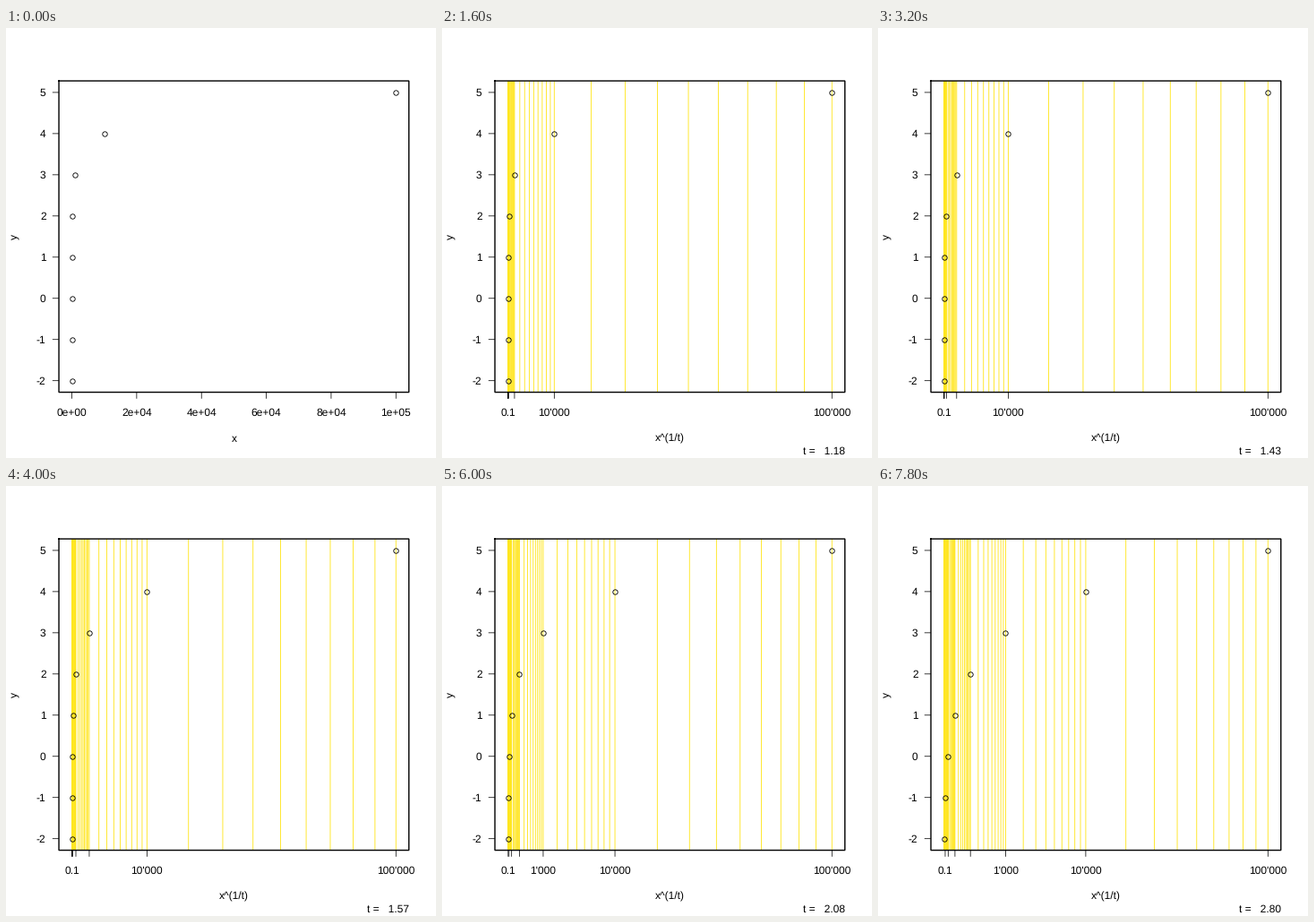
Recreate the animation shown at these times as a matplotlib script. Size 480x480 px, loop 8 s.

```python
import numpy as np
import matplotlib.pyplot as plt
from matplotlib.animation import FuncAnimation

plt.rcParams.update({
    "font.family": "Liberation Sans",
    "font.size": 12,
    "text.hinting": "none",
    "path.snap": False,
})

SIZE, DPI = 480, 72
FRAMES, INTERVAL = 40, 200
LEFT, RIGHT, TOP, BOTTOM = 59.04, 449.76, 59.04, 406.56
TICK = 7.2
PAD = 0.04 / 1.08
YELLOW = "#ffe620"

X = 10.0 ** np.arange(-2, 6)
Y = np.arange(-2, 6)
GRID = np.append(np.outer(X[:-1], np.arange(1, 10)).ravel(), X[-1])
POWER_LABELS = ["0.1", "1", "10", "100", "1'000", "10'000", "100'000"]
LINEAR_TICKS = np.arange(0, 100001, 20000)
LINEAR_LABELS = ["0e+00", "2e+04", "4e+04", "6e+04", "8e+04", "1e+05"]


def exponent(k):
    """The power 1/t applied to x at step k."""
    return 1.0 if k == 0 else 0.99774 - 0.01994 * k + 0.00009 * k * k


def to_px(x, p):
    lo, hi = X[0] ** p, X[-1] ** p
    u = (np.asarray(x, float) ** p - lo) / (hi - lo)
    span = RIGHT - LEFT
    return LEFT + span * (PAD + (1 - 2 * PAD) * u)


def y_px(y):
    u = (np.asarray(y, float) - Y[0]) / (Y[-1] - Y[0])
    span = BOTTOM - TOP
    return BOTTOM - span * (PAD + (1 - 2 * PAD) * u)


def text_width(s):
    narrow = {".": 3.334, "'": 2.29}
    return sum(narrow.get(c, 6.674) for c in s)


def fitting(labels, xs, gap=10):
    """Blank each label that would crowd the one before it."""
    shown, edge = [], -np.inf
    for s, x in zip(labels, xs):
        half = text_width(s) / 2
        fits = x - half - gap > edge
        shown.append(s if fits else "")
        if fits:
            edge = x + half
    return shown


def verticals(xs, y0, y1):
    return [[(x, y0), (x, y1)] for x in xs]


fig = plt.figure(figsize=(SIZE / DPI, SIZE / DPI), dpi=DPI, facecolor="white")
ax = fig.add_axes([0, 0, 1, 1])
ax.set_xlim(0, SIZE)
ax.set_ylim(SIZE, 0)
ax.axis("off")

grid = ax.vlines([], TOP, BOTTOM, color=YELLOW, lw=0.9, zorder=1)
ticks = ax.vlines([], BOTTOM, BOTTOM + TICK, color="black", lw=0.75, zorder=2)
ax.hlines(y_px(Y), LEFT - TICK, LEFT, color="black", lw=0.75, zorder=2)
ax.plot([LEFT, RIGHT, RIGHT, LEFT, LEFT], [TOP, TOP, BOTTOM, BOTTOM, TOP],
        color="black", lw=1.4, solid_joinstyle="miter",
        solid_capstyle="projecting", zorder=3)
points, = ax.plot([], [], "o", ms=5.4, mfc="none", mec="black", mew=0.85,
                  zorder=4)

for v, y in zip(Y, y_px(Y)):
    ax.text(LEFT - 14.4, y + 4.3, str(v), ha="right", va="baseline")
ax.text(12.3, (TOP + BOTTOM) / 2, "y", rotation=90, rotation_mode="anchor",
        ha="center", va="baseline")
x_title = ax.text((LEFT + RIGHT) / 2, 461.6, "", ha="center", va="baseline")
t_label = ax.text(RIGHT, 476, "", ha="right", va="baseline")
tick_texts = [ax.text(0, 433, "", ha="center", va="baseline")
              for _ in POWER_LABELS]


def draw(k):
    p = exponent(k)
    if k == 0:
        tick_x, labels = to_px(LINEAR_TICKS, p), LINEAR_LABELS
        grid.set_segments([])
        x_title.set_text("x")
        t_label.set_text("")
    else:
        tick_x = to_px(X[1:], p)
        labels = fitting(POWER_LABELS, tick_x)
        grid.set_segments(verticals(to_px(GRID, p), TOP, BOTTOM))
        x_title.set_text("x^(1/t)")
        t_label.set_text(f"t =   {1 / p:.2f}")

    ticks.set_segments(verticals(tick_x, BOTTOM, BOTTOM + TICK))
    for text in tick_texts:
        text.set_text("")
    for text, s, x in zip(tick_texts, labels, tick_x):
        text.set_text(s)
        text.set_x(x)
    points.set_data(to_px(X, p), y_px(Y))
    return [grid, ticks, points, x_title, t_label, *tick_texts]


anim = FuncAnimation(fig, draw, frames=FRAMES, interval=INTERVAL,
                     init_func=lambda: draw(0), repeat=True, repeat_delay=0)
plt.show()
```
